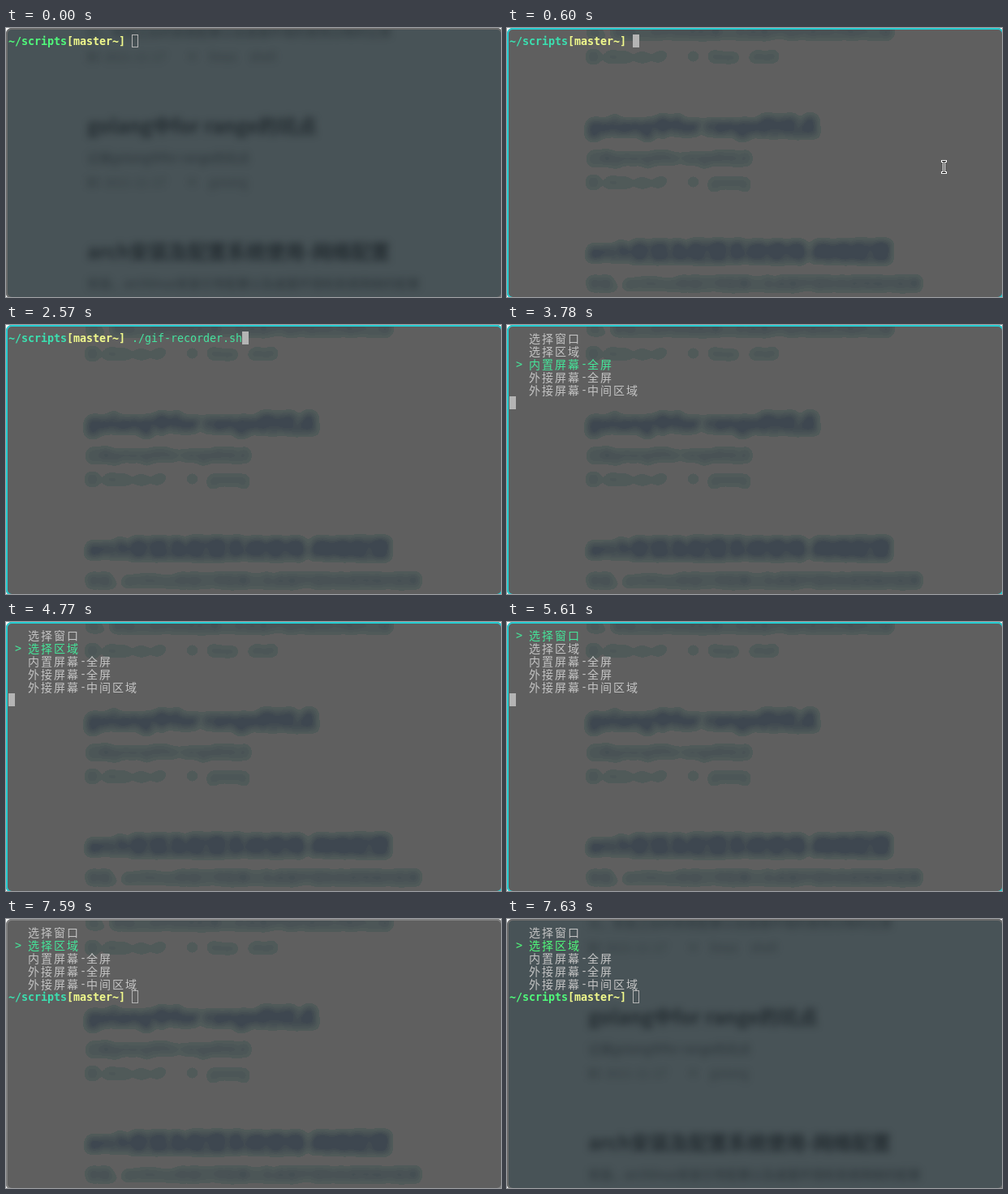
Recreate the animation shown at these times as an HTML page with a canvas. Size 610 by 332 pixels, loop 8 s.

```html
<!DOCTYPE html>
<html lang="zh-CN">
<head>
<meta charset="utf-8">
<title>Terminal menu</title>
<style>
  html, body { margin: 0; width: 100%; height: 100%; overflow: hidden; background: #fff; }
  canvas { display: block; }
</style>
</head>
<body>
<canvas id="stage" width="610" height="332"></canvas>
<script>
const W = 610, H = 332, LOOP = 8000, CELL = 8, ROW = 16;
const FOCUS = 600, POINTER_HIDES = 1850, MENU_OPENS = 2840, MENU_ENDS = 6410, BLUR = 7550, FROST = 7630;
const DOWN_KEYS = [3640, 3780, 3910, 4770, 4950, 5080, 5880];
const UP_KEYS = [4180, 4360, 4500, 5300, 5480, 5610];
const MENU = ['选择窗口', '选择区域', '内置屏幕-全屏', '外接屏幕-全屏', '外接屏幕-中间区域'];
const MONO = '"DejaVu Sans Mono", "Noto Sans Mono", monospace';
const CJK = '"Noto Sans CJK SC", "Noto Sans CJK", sans-serif';
const GRAY = '#b4b4b4', GREEN = '#45e3a0';
const ctx = document.getElementById('stage').getContext('2d');

function layer(paint) {
  const canvas = document.createElement('canvas');
  canvas.width = W;
  canvas.height = H;
  paint(canvas.getContext('2d'));
  return canvas;
}

// Blurred page behind the terminal
const page = layer(c => {
  c.filter = 'blur(5px)';
  c.textBaseline = 'middle';
  const ink = alpha => c.fillStyle = `rgba(28, 36, 41, ${alpha})`;
  const text = (string, x, y, font, alpha) => {
    ink(alpha);
    c.font = `${font} ${CJK}`;
    c.fillText(string, x, y);
  };
  const heading = (string, y) => text(string, 100, y, 'bold 24px', 1);
  const body = (string, y) => text(string, 100, y, '15px', .8);
  const meta = (y, ...tags) => {
    ink(.25);
    c.fillRect(100, y - 6, 13, 13);
    c.fillRect(225, y - 4, 9, 8);
    text('2021-11-17', 120, y, '15px', .55);
    tags.forEach((tag, i) => text(tag, 250 + i * 50, y, '15px', .6));
  };
  body('以，安装之后的系统配置以及桌面环境的使用过程的记录', 4);
  meta(35, 'linux', 'shell');
  heading('golang中for range的坑点', 121);
  body('记录golang中for range的坑点', 160);
  meta(190, 'golang');
  heading('arch安装及配置系统使用-网络配置', 276);
  body('安装，archlinux安装引导配置以及桌面环境和系统网络的配置', 315);
});

const smooth = layer(c => {
  c.fillStyle = '#485357';
  c.fillRect(0, 0, W, H);
  c.globalAlpha = .85;
  c.drawImage(page, 0, 0);
});

// The same page reduced to a few flat tones by ink density
const posterized = layer(c => {
  c.drawImage(page, 0, 0);
  const image = c.getImageData(0, 0, W, H), px = image.data;
  for (let i = 0; i < px.length; i += 4) {
    const band = Math.min(5, Math.floor((px[i + 3] / 255 - .05) / .07));
    const tone = band < 0 ? [95, 95, 95] : [80 - 3.6 * band, 90 - 3.8 * band, 89 - 1.9 * band];
    px.set([...tone, 255], i);
  }
  c.putImageData(image, 0, 0);
});

// Terminal text on a fixed grid; wide characters take two cells
function write(text, col, row, color, weight = 'normal') {
  ctx.fillStyle = color;
  for (const char of text) {
    const wide = char > '\u2e7f';
    ctx.font = wide ? `${weight} 14px ${CJK}` : `${weight} 13.33px ${MONO}`;
    ctx.fillText(char, 3 + col * CELL, 21 + row * ROW + (wide ? 1 : 0));
    col += wide ? 2 : 1;
  }
}

function cursor(col, row, hollow) {
  const x = 3 + col * CELL, y = 8 + row * ROW;
  ctx.fillStyle = ctx.strokeStyle = GRAY;
  ctx.lineWidth = 1;
  if (hollow) ctx.strokeRect(x + .5, y + .5, CELL - 1, ROW - 1);
  else ctx.fillRect(x, y, CELL, ROW);
}

function prompt(row, flat) {
  write('~/scripts', 0, row, flat ? '#3be0b0' : '#50fa7b', 'bold');
  write('[master~]', 9, row, '#f1fa8c', 'bold');
}

function pointer(x, y) {
  ctx.lineCap = 'square';
  for (const [color, width] of [['#fff', 3], ['#111', 1]]) {
    ctx.strokeStyle = color;
    ctx.lineWidth = width;
    ctx.beginPath();
    for (const end of [y - 7, y + 7]) {
      ctx.moveTo(x - 2, end);
      ctx.lineTo(x + 2, end);
      ctx.moveTo(x, end);
      ctx.lineTo(x, y);
    }
    ctx.stroke();
  }
}

// The window runs just past the right and bottom edges; its corners show white
function border(color) {
  ctx.fillStyle = '#fff';
  ctx.beginPath();
  ctx.rect(0, 0, W, H);
  ctx.roundRect(0, 0, W + 2, H + 2, 7);
  ctx.fill('evenodd');
  ctx.strokeStyle = color;
  ctx.lineWidth = 2;
  ctx.beginPath();
  ctx.roundRect(1, 1, W, H, 6);
  ctx.stroke();
}

function typed(t) {
  if (t < 1890) return ['', GRAY];
  if (t < 2070) return ['.', GREEN];
  return t < 2570 ? ['./', '#f25a5a'] : ['./gif-recorder.sh', GREEN];
}

function draw(t) {
  const flat = t >= FOCUS && t < FROST;
  const hollow = t < FOCUS || t >= BLUR;
  ctx.drawImage(flat ? posterized : smooth, 0, 0);
  border(!flat ? '#6c6c6c' : t < BLUR ? '#27cdd2' : t < BLUR + 40 ? '#5fa3a5' : '#808080');

  if (t < MENU_OPENS) {
    const [command, color] = typed(t);
    prompt(0, flat);
    write(command, 19, 0, color);
    cursor(19 + command.length, 0, hollow);
    if (t >= FOCUS && t < POINTER_HIDES) pointer(538.5, 171.5);
    return;
  }

  const presses = keys => keys.filter(time => time <= t).length;
  const selected = presses(DOWN_KEYS) - presses(UP_KEYS);
  const highlight = flat ? '#45e69a' : '#50fa7b';
  MENU.forEach((item, row) => write(item, 3, row, row === selected ? highlight : '#c4c4c4'));
  write('>', 1, selected, highlight);
  if (t >= MENU_ENDS) prompt(5, flat);
  cursor(t < MENU_ENDS ? 0 : 19, 5, hollow);
}

function tick() {
  draw(performance.now() % LOOP);
  requestAnimationFrame(tick);
}
tick();
</script>
</body>
</html>
```
